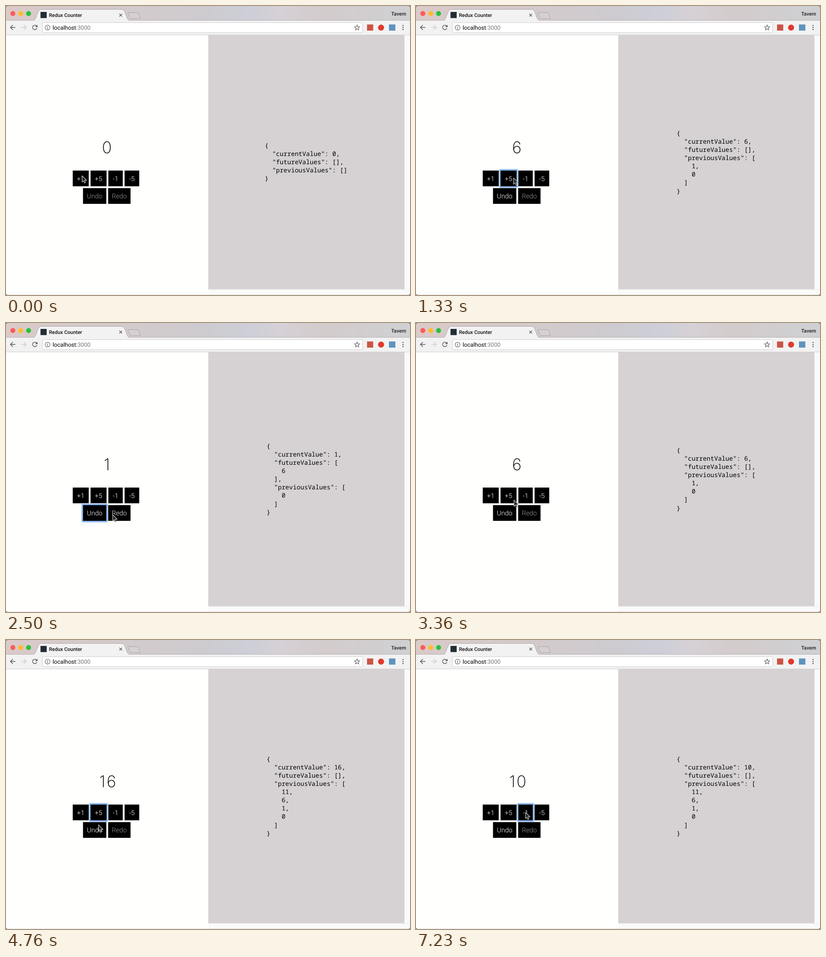
Write an HTML page with a canvas that moves like this. It is 884 px wide and 634 px high and loops after 8.26 s.

```html
<!DOCTYPE html>
<html lang="en">
<head>
<meta charset="utf-8">
<title>Redux Counter</title>
<style>
  html, body { margin: 0; width: 100%; height: 100%; overflow: hidden; background: #fffffe; }
  canvas { display: block; width: 884px; height: 634px; }
</style>
</head>
<body>
<canvas id="stage" width="884" height="634"></canvas>
<script>
const ctx = document.getElementById('stage').getContext('2d');
const LOOP = 8260;
const FRAME = 100 / 3;
const UI = 'Roboto, Inter, sans-serif';
const MONO = '"Noto Sans Mono", "DejaVu Sans Mono", monospace';

// label: x, y, width
const BUTTONS = {
  '+1': [146, 361, 35],
  '+5': [185, 361, 35],
  '-1': [224, 361, 31.5],
  '-5': [259.5, 361, 32],
  Undo: [168.5, 399.5, 51],
  Redo: [223.5, 399.5, 49]
};

// mouse down moves the focus, mouse up fires the action
const FOCUS = [
  [300, '+1'], [1030, '+5'], [1900, 'Undo'], [2800, 'Redo'], [2900, ''],
  [3760, '+5'], [4900, 'Undo'], [6400, '+5'], [7130, '-1']
];
const ACTIONS = [
  [400, '+1'], [1130, '+5'], [2000, 'Undo'], [2900, 'Redo'], [3860, '+5'],
  [4400, '+5'], [5130, 'Undo'], [5730, 'Undo'], [6500, '+5'], [7230, '-1']
];

// pointer path: ms, x, y
const PATH = [
  [0, 166, 372], [570, 166, 372], [870, 213, 374],
  [1295, 213, 374], [1335, 213, 377], [1500, 203, 397], [1700, 195, 414],
  [2130, 195, 414], [2500, 233, 420], [2630, 241, 419],
  [3100, 241, 419], [3365, 214, 388], [3640, 206, 377],
  [4400, 206, 377], [4760, 202, 405],
  [5800, 202, 405], [6065, 205, 381], [6200, 206, 377],
  [6530, 206, 377], [6760, 239, 377.5], [LOOP, 239, 377.5]
];

function reduce(s, action) {
  const { currentValue: now, futureValues: next, previousValues: prev } = s;
  const make = (currentValue, futureValues, previousValues) =>
    ({ currentValue, futureValues, previousValues });
  if (action === 'Undo') return make(prev[0], [now, ...next], prev.slice(1));
  if (action === 'Redo') return make(next[0], next.slice(1), [now, ...prev]);
  return make(now + Number(action), [], [now, ...prev]);
}

function stateAt(t) {
  return ACTIONS.filter(a => a[0] <= t).reduce((s, a) => reduce(s, a[1]),
    { currentValue: 0, futureValues: [], previousValues: [] });
}

function focusAt(t) {
  const past = FOCUS.filter(f => f[0] <= t);
  return past.length ? past[past.length - 1][1] : '';
}

// monotone cubic through the path points
function pathValue(t, axis) {
  const slope = i => PATH[i] && PATH[i + 1]
    ? (PATH[i + 1][axis] - PATH[i][axis]) / (PATH[i + 1][0] - PATH[i][0]) : 0;
  const tangent = i => {
    const a = slope(i - 1), b = slope(i);
    return a * b > 0 ? 2 * a * b / (a + b) : 0;
  };
  let i = 0;
  while (i < PATH.length - 2 && PATH[i + 1][0] <= t) i++;
  const span = PATH[i + 1][0] - PATH[i][0];
  const u = (t - PATH[i][0]) / span, v = 1 - u;
  return PATH[i][axis] * v * v * (1 + 2 * u) + PATH[i + 1][axis] * u * u * (1 + 2 * v)
    + span * u * v * (v * tangent(i) - u * tangent(i + 1));
}

function rect(x, y, w, h, color) {
  ctx.fillStyle = color;
  ctx.fillRect(x, y, w, h);
}

function paint(fill, stroke, width = 1) {
  if (fill) { ctx.fillStyle = fill; ctx.fill(); }
  if (stroke) { ctx.strokeStyle = stroke; ctx.lineWidth = width; ctx.stroke(); }
}

function shape(points, fill, stroke, width = 1, open = false) {
  ctx.beginPath();
  points.forEach(([x, y]) => ctx.lineTo(x, y));
  if (!open) ctx.closePath();
  paint(fill, stroke, width);
}

function circle(x, y, r, fill, stroke, width) {
  ctx.beginPath();
  ctx.arc(x, y, r, 0, Math.PI * 2);
  paint(fill, stroke, width);
}

function round(x, y, w, h, r, fill, stroke, width) {
  ctx.beginPath();
  ctx.roundRect(x, y, w, h, r);
  paint(fill, stroke, width);
}

function text(str, x, y, font, color, align = 'left') {
  ctx.font = font;
  ctx.fillStyle = color;
  ctx.textAlign = align;
  ctx.fillText(str, x, y);
}

function drawTabs() {
  const g = ctx.createLinearGradient(0, 0, 884, 0);
  [[0, '#dacac8'], [0.3, '#d3cacb'], [0.5, '#cdcbd0'], [0.6, '#cdced8'],
   [0.68, '#d6d1d6'], [0.78, '#d3cbcc'], [1, '#cfd0d3']].forEach(s => g.addColorStop(...s));
  rect(0, 0, 884, 32, g);
  rect(0, 31, 884, 1, '#b5b1b2');
  ['#fc5b57', '#fdbc2e', '#29c13d'].forEach((c, i) => circle(15 + i * 17.2, 16.5, 5.4, c));

  ctx.beginPath();
  ctx.moveTo(60, 32);
  ctx.bezierCurveTo(67, 31, 68, 8, 76, 7.5);
  ctx.lineTo(254, 7.5);
  ctx.bezierCurveTo(262, 8, 263, 31, 270, 32);
  paint('#f3f2f3', '#aaa6a7');
  shape([[266.5, 14.5], [289, 14.5], [294.5, 27.5], [272, 27.5]], '#d5d0d1', '#aba7a8');

  rect(75.5, 13, 13.5, 13.5, '#212d35');
  text('Redux Counter', 94, 23.5, '500 11px ' + UI, '#111');
  shape([[248, 17], [254, 23]], null, '#555', 1.2, true);
  shape([[254, 17], [248, 23]], null, '#555', 1.2, true);
  text('Tavem', 843, 20.5, '500 11px ' + UI, '#222');
}

function arrow(x, dir, color) {
  shape([[x - 5.5 * dir, 47], [x + 5.5 * dir, 47]], null, color, 1.5, true);
  shape([[x, 41.7], [x - 5.3 * dir, 47], [x, 52.3]], null, color, 1.5, true);
}

function drawToolbar() {
  rect(0, 32, 884, 31, '#f3f2f3');
  rect(0, 63, 884, 1, '#cfcdce');
  arrow(15, 1, '#555');
  arrow(39, -1, '#ccc');
  ctx.beginPath();
  ctx.arc(63, 47, 4.8, 0.35, Math.PI * 1.75);
  paint(null, '#555', 1.5);
  shape([[69, 41.3], [69, 46.3], [64, 46.3]], '#555');

  round(79.5, 36.5, 701, 22, 2.5, '#fff', '#cfcdce');
  circle(91, 47.3, 5.3, null, '#555', 1.1);
  rect(90.4, 46.5, 1.3, 3.8, '#555');
  rect(90.4, 44.2, 1.3, 1.3, '#555');
  const font = '12.6px ' + UI;
  text('localhost', 102, 51.7, font, '#000');
  text(':3000', 102 + ctx.measureText('localhost').width, 51.7, font, '#777');

  const star = Array.from({ length: 10 }, (_, i) => {
    const a = i * Math.PI / 5 - Math.PI / 2, r = i % 2 ? 2.5 : 6;
    return [768.3 + r * Math.cos(a), 47.6 + r * Math.sin(a)];
  });
  shape(star, null, '#555', 1.1);
  rect(790, 40.5, 13.5, 13.5, '#cb5444');
  circle(820.7, 47.3, 6.6, '#df3a2d');
  rect(838, 40.5, 14, 13.5, '#5d94bf');
  [42.8, 47.2, 51.6].forEach(y => circle(868.8, y, 1.3, '#555'));
}

function drawPage() {
  rect(0, 64, 884, 570, '#fffffe');
  rect(443, 64, 441, 570, '#fafafa');
  rect(442.5, 63.5, 429.5, 558, '#d6d2d3');
  rect(443, 621.5, 441, 1, '#ececec');
  rect(0, 633, 884, 1, '#dedede');
}

function drawButtons(state, focus) {
  const off = {
    Undo: !state.previousValues.length,
    Redo: !state.futureValues.length
  };
  for (const [label, [x, y, w]] of Object.entries(BUTTONS)) {
    if (label === focus) {
      round(x - 4, y - 4, w + 8, 42.5, 4, '#dce9fc');
      round(x - 3, y - 3, w + 6, 40.5, 3, '#90bbf5');
    }
    rect(x, y, w, 34.5, '#000');
    text(label, x + w / 2, y + 22.8, '350 14.6px ' + UI, off[label] ? '#96999b' : '#fff', 'center');
  }
}

function drawState(state) {
  // tabular digits, 20 px apart
  const digits = [...String(state.currentValue)];
  digits.forEach((d, i) => {
    const x = 220.7 + (i - (digits.length - 1) / 2) * 20;
    text(d, x, 323, '200 35.5px Inter, Roboto, sans-serif', '#000', 'center');
  });
  const lines = JSON.stringify(state, null, 2).split('\n');
  const cols = Math.max(...lines.map(l => l.length));
  const left = 656.4 - cols * 4.1;
  lines.forEach((line, i) => {
    const y = 342.4 + (i - (lines.length - 1) / 2) * 18.07 + 4.9;
    text(line, left, y, '500 13.7px ' + MONO, '#000');
  });
}

function drawPointer(x, y) {
  const outline = [[0, 0], [0, 13.6], [3.1, 10.8], [5.2, 15.8], [7.6, 14.8], [5.5, 9.9], [9.8, 9.9]];
  ctx.save();
  ctx.translate(x + 0.5, y + 0.5);
  ctx.lineJoin = 'round';
  shape(outline, null, 'rgba(90,90,90,0.3)', 2.2);
  shape(outline, '#262626', '#c4c4c4', 1.1);
  ctx.restore();
}

function drawCorners() {
  ctx.beginPath();
  ctx.rect(0, 0, 884, 634);
  ctx.roundRect(0, 0, 884, 634, 4);
  ctx.fillStyle = '#4a4747';
  ctx.fill('evenodd');
}

function draw(now) {
  const t = now % LOOP;
  // the pointer moves on a 30 fps grid
  const step = Math.floor((t + 7) / FRAME) * FRAME;
  const state = stateAt(t);
  ctx.textRendering = 'geometricPrecision';
  drawTabs();
  drawToolbar();
  drawPage();
  drawState(state);
  drawButtons(state, focusAt(t));
  drawPointer(pathValue(step, 1), pathValue(step, 2));
  drawCorners();
}

let start = null;
function tick(now) {
  if (start === null) start = now;
  draw(Math.max(0, now - start));
  requestAnimationFrame(tick);
}
draw(0);
requestAnimationFrame(tick);
</script>
</body>
</html>
```
